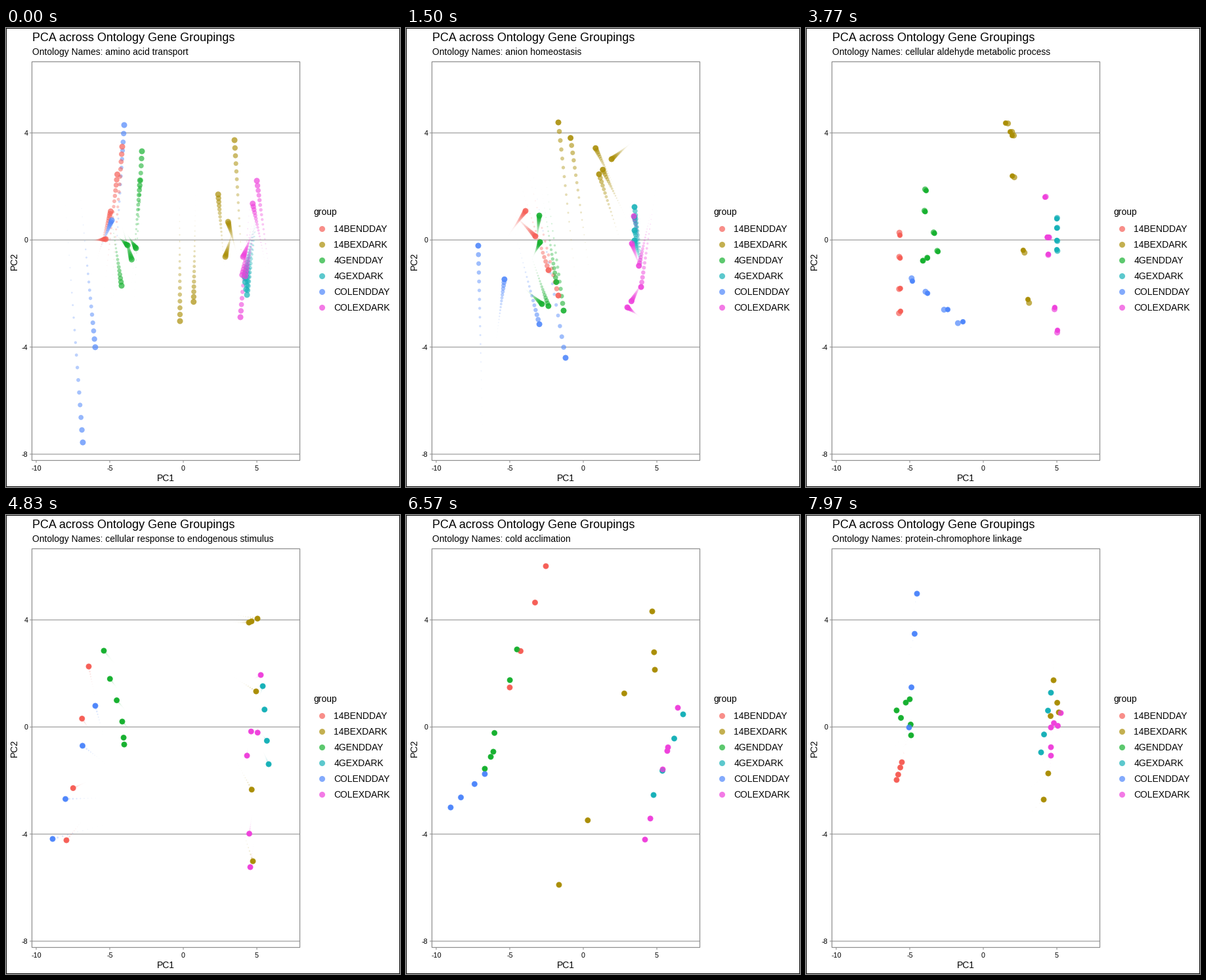
Animation, 600 px wide and 700 px high, one loop 8000 ms. Source, as a matplotlib script:

```python
import matplotlib.pyplot as plt
import numpy as np
from matplotlib.animation import FuncAnimation
from matplotlib.colors import to_rgb
from matplotlib.patches import Rectangle

W, H, DPI = 600, 700, 100
FRAMES, LOOP_MS = 240, 8000
PX = 72 / DPI                      # points per pixel

RADIUS, ALPHA = 4.5, 0.7
WAKE = 26                          # frames a trail stays visible
STEPS, CYCLE = 22, 45              # frames per move, frames per state
STARTS = [-STEPS] + [STEPS + CYCLE * i for i in range(5)]
ORIGIN = 270 + 323.3j              # stage position of PC1 = PC2 = 0

GROUPS = {
    "14BENDDAY": "#f65f57",
    "14BEXDARK": "#aa8e06",
    "4GENDDAY": "#17b130",
    "4GEXDARK": "#17b1b8",
    "COLENDDAY": "#4f87fb",
    "COLEXDARK": "#ef42dc",
}

terms, states = [], []


def with_mates(keys):
    """Give each key sample a mate, part of the way to the next key."""
    keys = np.array(keys)
    return np.concatenate([keys, keys + 0.3 * (np.roll(keys, -1) - keys)])


def add_state(term, *groups):
    """Key samples of each group, in stage pixels as x + yj."""
    terms.append(term)
    states.append(np.concatenate([with_mates(keys) for keys in groups]))


def flipped(points):
    """The state before the first: PC2 changes sign, PC1 spreads a little."""
    d = points - ORIGIN
    return ORIGIN + 1.2 * d.real + 1j * np.clip(-0.8 * d.imag, -110, 110)


add_state("amino acid transport",
          [152+322j, 177+181j], [265+447j, 334+349j, 348+171j],
          [207+188j, 198+336j, 176+393j], [367+407j, 363+379j],
          [117+632j, 180+148j], [382+233j, 361+349j, 357+441j])
add_state("anion homeostasis",
          [182+279j, 232+408j], [232+144j, 294+223j, 313+200j],
          [240+431j, 203+286j, 207+421j], [348+273j, 348+324j],
          [110+332j, 243+503j], [358+395j, 347+287j, 337+426j])
add_state("cellular aldehyde metabolic process",
          [144+432j, 143+316j], [314+164j, 304+145j, 338+414j],
          [178+355j, 201+341j, 183+248j], [382+338j, 382+291j],
          [239+448j, 162+386j], [383+461j, 369+345j, 364+258j])
add_state("cellular response to endogenous stimulus",
          [92+496j, 126+231j], [370+164j, 383+158j, 376+528j],
          [180+350j, 177+315j, 149+207j], [400+380j, 391+261j],
          [71+494j, 136+291j], [372+537j, 367+367j, 388+244j])
add_state("cold acclimation",
          [213+78j, 158+263j], [379+236j, 375+147j, 233+564j],
          [133+361j, 120+387j, 169+205j], [377+427j, 422+304j],
          [68+446j, 120+395j], [364+495j, 391+388j, 414+294j])
add_state("protein-chromophore linkage",
          [146+377j, 138+404j], [385+301j, 377+252j, 362+434j],
          [138+298j, 160+336j, 158+281j], [358+362j, 373+271j],
          [157+324j, 169+120j], [373+367j, 373+324j, 388+302j])

states.insert(0, flipped(states[0]))
SIZES = (4, 6, 6, 4, 4, 6)
colors = np.repeat([to_rgb(c) for c in GROUPS.values()], SIZES, axis=0)


def positions(frame):
    """Sample positions; moves are linear with rests between them."""
    u = sum(min(max((frame - s) / STEPS, 0), 1) for s in STARTS)
    i = min(int(u), len(STARTS) - 1)
    return states[i] + (u - i) * (states[i + 1] - states[i])


def term_at(frame):
    """The nearest state's name, switching halfway through a move."""
    return terms[sum(frame > s + STEPS / 2 for s in STARTS[1:])]


def dot_area(radius):
    return (2 * radius * PX) ** 2


plt.rcParams["font.family"] = "Liberation Sans"
fig = plt.figure(figsize=(W / DPI, H / DPI), dpi=DPI, facecolor="white")
ax = fig.add_axes([0, 0, 1, 1])
ax.set_xlim(0, W)
ax.set_ylim(H, 0)
ax.axis("off")


def label(x, y, text, size=13.9, **kw):
    return ax.text(x, y, text, fontsize=size * PX, color="black",
                   va="baseline", **kw)


def line(x0, y0, x1, y1, color, width):
    ax.plot([x0, x1], [y0, y1], color=color, lw=width * PX,
            solid_capstyle="butt", snap=False, zorder=1)


def frame_box(x0, y0, x1, y1, color, width):
    ax.add_patch(Rectangle((x0, y0), x1 - x0, y1 - y0, fill=False, ec=color,
                           lw=width * PX, snap=False, zorder=4))


LEFT, TOP, RIGHT, BOTTOM = 39.5, 51.5, 447.5, 659.5
for value in (4, 0, -4, -8):
    y = ORIGIN.imag - 40.83 * value
    line(LEFT, y, RIGHT, y, "#a9a9a9", 1.4)
    line(LEFT - 3.5, y, LEFT, y, "#8c8c8c", 1)
    label(33.5, y + 4, f"{value}", 10.8, ha="right")
for value in (-10, -5, 0, 5):
    x = ORIGIN.real + 22.4 * value
    line(x, BOTTOM, x, BOTTOM + 3.5, "#8c8c8c", 1)
    label(x, 675, f"{value}", 10.8, ha="center")

frame_box(LEFT, TOP, RIGHT, BOTTOM, "#8c8c8c", 1.2)
frame_box(0.5, 0.5, W - 0.5, H - 0.5, "black", 1)

label(39.5, 20.3, "PCA across Ontology Gene Groupings", 18)
subtitle = label(39.5, 41, "")
label(243.5, 691, "PC1", ha="center")
label(17, 355.5, "PC2", ha="center", rotation=90, rotation_mode="anchor")

label(468.5, 285, "group")
for i, (name, color) in enumerate(GROUPS.items()):
    y = 305.7 + 24 * i
    ax.scatter([480.7], [y], s=dot_area(RADIUS), color=color,
               alpha=ALPHA, linewidths=0)
    label(499.5, y + 5.3, name)

# Oldest trail first, so the current points end up on top.
ages = np.arange(WAKE - 1, -1, -1)
fade = np.repeat((1 - ages / WAKE) ** 2, len(colors))
rgba = np.column_stack([np.tile(colors, (WAKE, 1)), ALPHA * fade])
dots = ax.scatter(np.zeros(len(fade)), np.zeros(len(fade)),
                  s=dot_area(RADIUS * fade), c=rgba, linewidths=0, zorder=3)


def update(frame):
    points = np.concatenate([positions(frame - age) for age in ages])
    dots.set_offsets(np.column_stack([points.real, points.imag]))
    subtitle.set_text("Ontology Names: " + term_at(frame))
    return dots, subtitle


def init():
    return update(0)


anim = FuncAnimation(fig, update, frames=FRAMES, init_func=init,
                     interval=LOOP_MS / FRAMES, repeat=True, repeat_delay=0)
plt.show()
```
